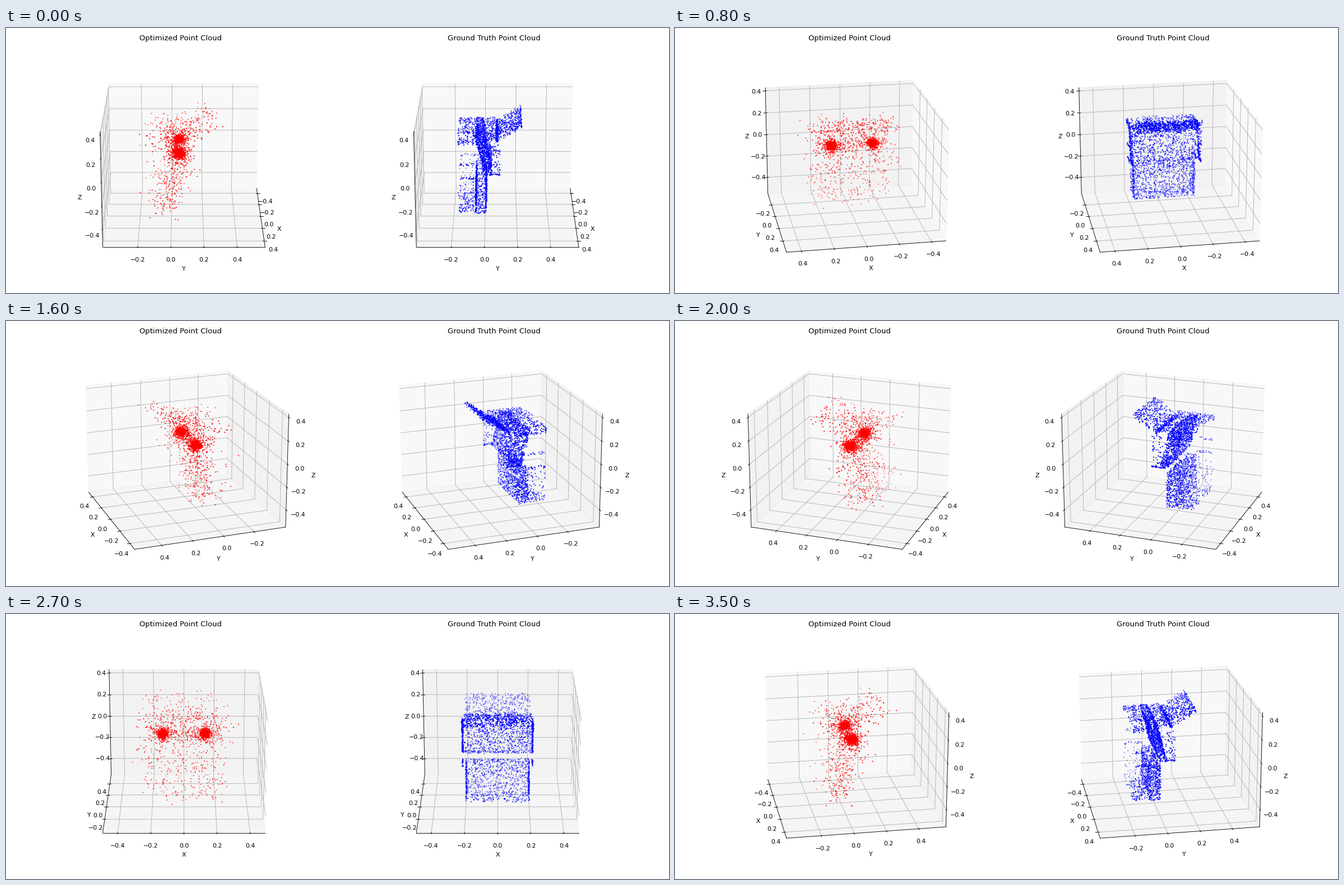
Write a matplotlib script that moves like this. It is 1183 px wide and 473 px high and loops after 3.6 s.

```python
import numpy as np
import matplotlib.pyplot as plt
from matplotlib.animation import FuncAnimation

WIDTH, HEIGHT, DPI = 1183, 473, 78.87
SIDE, BOTTOM = 432, 12          # square plot area, px
FRAMES, INTERVAL = 36, 100
HALF_RANGE = 0.4905

rng = np.random.default_rng(7)


def patch(n, x, y, z, jitter=0.002):
    """Random points in a box; equal bounds give a flat face."""
    pts = np.column_stack([rng.uniform(lo, hi, n) for lo, hi in (x, y, z)])
    return pts + rng.normal(0, jitter, pts.shape)


def both_sides(n, x, y, z):
    """The same face at -x and +x."""
    return np.vstack([patch(n // 2, (s * x, s * x), y, z) for s in (-1, 1)])


def slab(n, x, y, z, lean=0.0):
    """Upright board: two faces, two ends, top and bottom edges."""
    pts = np.vstack([
        patch(int(n * 0.35), (-x, x), (y[0], y[0]), z),
        patch(int(n * 0.30), (-x, x), (y[1], y[1]), z),
        both_sides(int(n * 0.20), x, y, z),
        patch(int(n * 0.08), (-x, x), y, (z[0], z[0])),
        patch(int(n * 0.07), (-x, x), y, (z[1], z[1])),
    ])
    pts[:, 1] += lean * (z[1] - pts[:, 2]) / (z[1] - z[0])
    return pts


def sloped_wing(n):
    t = rng.uniform(0, 1, n)
    pts = np.column_stack([rng.uniform(-0.206, 0.206, n),
                           0.07 + 0.154 * t, 0.225 + 0.135 * t])
    pts[:, 2] -= rng.uniform(0, 0.03, n)
    return pts


def make_truth():
    return np.vstack([
        sloped_wing(330),
        patch(40, (-0.206, 0.206), (0.224, 0.224), (0.32, 0.36)),
        patch(130, (-0.21, 0.21), (0.068, 0.082), (0.20, 0.245)),
        patch(300, (-0.215, 0.215), (-0.165, 0.07), (0.235, 0.245)),
        both_sides(70, 0.215, (-0.165, -0.04), (0.19, 0.24)),
        slab(1050, 0.218, (-0.055, -0.012), (-0.07, 0.24), lean=0.055),
        both_sides(90, 0.218, (0.03, 0.097), (-0.07, 0.2)),
        both_sides(40, 0.218, (0.03, 0.097), (-0.07, -0.06)),
        both_sides(40, 0.215, (-0.165, -0.04), (-0.11, -0.09)),
        both_sides(24, 0.215, (-0.165, -0.04), (0.01, 0.03)),
        slab(850, 0.195, (-0.055, 0.008), (-0.42, -0.12)),
        patch(110, (-0.195, 0.195), (-0.165, -0.055), (-0.42, -0.41)),
        both_sides(90, 0.195, (-0.165, -0.055), (-0.41, -0.13)),
    ])


def make_optimized(truth):
    loose = truth[rng.choice(len(truth), 640, replace=False)]
    loose = loose + (0, 0.032, 0) + rng.normal(0, (0.05, 0.036, 0.03), loose.shape)
    parts = [loose]
    for x in (-0.132, 0.132):
        centre = (x, 0.049, 0.08)
        parts.append(rng.normal(centre, (0.014, 0.014, 0.017), (650, 3)))
        parts.append(rng.normal(centre, 0.036, (150, 3)))
    band = patch(110, (-0.14, 0.14), (0.04, 0.04), (0.08, 0.08))
    parts.append(band + rng.normal(0, 0.04, band.shape))
    return np.vstack(parts)


def add_cloud(fig, centre_x, points, color, title):
    ax = fig.add_axes([(centre_x - SIDE / 2) / WIDTH, BOTTOM / HEIGHT,
                       SIDE / WIDTH, SIDE / HEIGHT], projection="3d")
    ax.scatter(*points.T, c=color, s=1)
    ax.set_title(title)
    ticks = np.array([-0.4, -0.2, 0, 0.2, 0.4])
    for name, middle, marks in (("x", 0, ticks), ("y", 0.079, ticks[1:]),
                                ("z", -0.062, ticks)):
        ax.set(**{name + "ticks": marks, name + "label": name.upper()})
        ax.set(**{name + "lim": (middle - HALF_RANGE, middle + HALF_RANGE)})
    return ax


truth = make_truth()
fig = plt.figure(figsize=((WIDTH + 0.01) / DPI, (HEIGHT + 0.01) / DPI), dpi=DPI)
axes = [
    add_cloud(fig, 311.6, make_optimized(truth), "red", "Optimized Point Cloud"),
    add_cloud(fig, 871.2, truth, "blue", "Ground Truth Point Cloud"),
]


def update(i):
    for ax in axes:
        ax.view_init(elev=20, azim=i * 360 / FRAMES)
    return axes


anim = FuncAnimation(fig, update, frames=FRAMES, interval=INTERVAL,
                     repeat=True, repeat_delay=0)
plt.show()
```
